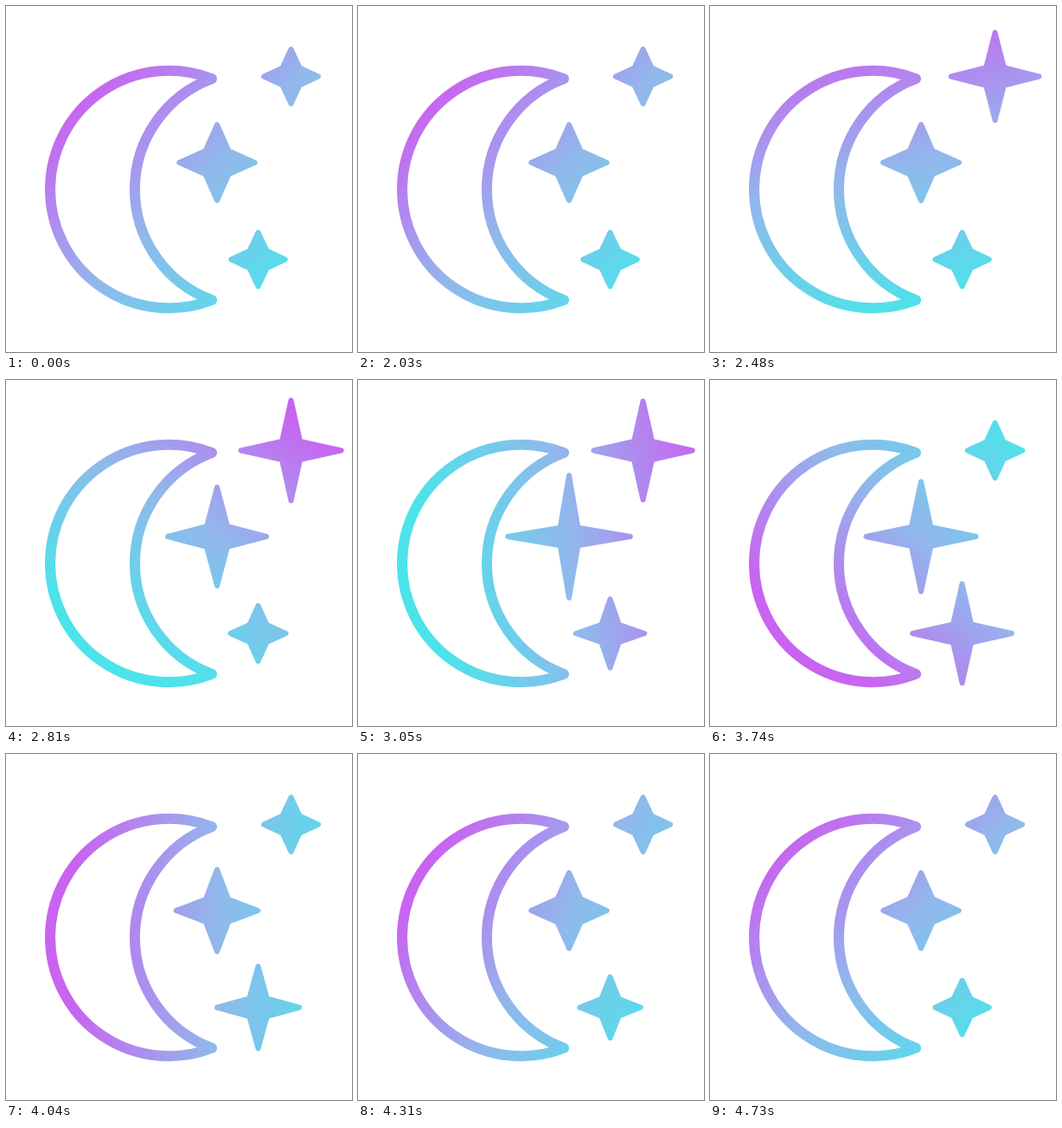
Recreate the animation shown at these times as an HTML page. Size 400 by 400 pixels, loop 5030 ms.

```html
<!DOCTYPE html>
<html lang="en">
<head>
<meta charset="utf-8">
<title>Moon and stars</title>
<style>
  html, body { margin: 0; width: 100%; height: 100%; overflow: hidden; background: #fff; }
  svg { display: block; width: 100%; height: 100%; }
  path { stroke-linejoin: round; stroke-linecap: round; }
</style>
</head>
<body>
<svg viewBox="0 0 400 400">
  <defs>
    <linearGradient id="sky" gradientUnits="userSpaceOnUse">
      <stop offset="0" stop-color="rgb(200,100,240)"/>
      <stop offset="0.5" stop-color="rgb(145,184,236)"/>
      <stop offset="1" stop-color="rgb(77,227,234)"/>
    </linearGradient>
  </defs>
  <path d="M238 84A137.3 137.3 0 1 0 238 340A136.5 136.5 0 0 1 238 84Z"
        fill="none" stroke="url(#sky)" stroke-width="12"/>
  <g id="stars" fill="url(#sky)" stroke="url(#sky)" stroke-width="6"></g>
</svg>
<script>
const LOOP = 5030;
const TURN = { start: 1980, end: 4640, x: 244, y: 181, half: 165 };

// tip and waist: [resting, extended]; keys: start growing, full, start shrinking, done
const stars = [
  { x: 329.5, y: 81.5, tip: [31.5, 58], waist: [10, 10.5], keys: [2000, 2740, 2950, 3795] },
  { x: 244, y: 181, tip: [43.7, 78], waist: [13.5, 9.5], keys: [2430, 3320, 3340, 4230] },
  { x: 291.5, y: 293, tip: [31.2, 57.7], waist: [10, 10.5], keys: [2710, 3600, 3680, 4530] }
];

const gradient = document.getElementById('sky');
const group = document.getElementById('stars');
for (const star of stars) {
  star.path = document.createElementNS('http://www.w3.org/2000/svg', 'path');
  group.append(star.path);
}

function ease(time, start, end) {
  const p = Math.min(1, Math.max(0, (time - start) / (end - start)));
  return (1 - Math.cos(Math.PI * p)) / 2;
}

const mix = ([from, to], amount) => from + (to - from) * amount;

function starPath(x, y, tip, waist) {
  const points = [
    [0, -tip], [waist, -waist], [tip, 0], [waist, waist],
    [0, tip], [-waist, waist], [-tip, 0], [-waist, -waist]
  ];
  return 'M' + points.map(([dx, dy]) => `${x + dx} ${y + dy}`).join('L') + 'Z';
}

function draw(time) {
  const angle = Math.PI * (2 * ease(time, TURN.start, TURN.end) + 0.25);
  const dx = TURN.half * Math.cos(angle);
  const dy = TURN.half * Math.sin(angle);
  gradient.setAttribute('x1', TURN.x - dx);
  gradient.setAttribute('y1', TURN.y - dy);
  gradient.setAttribute('x2', TURN.x + dx);
  gradient.setAttribute('y2', TURN.y + dy);

  for (const { x, y, tip, waist, keys, path } of stars) {
    const growth = ease(time, keys[0], keys[1]) - ease(time, keys[2], keys[3]);
    path.setAttribute('d', starPath(x, y, mix(tip, growth), mix(waist, growth)));
  }
}

const began = performance.now();
function frame() {
  draw((performance.now() - began) % LOOP);
  requestAnimationFrame(frame);
}
frame();
</script>
</body>
</html>
```
